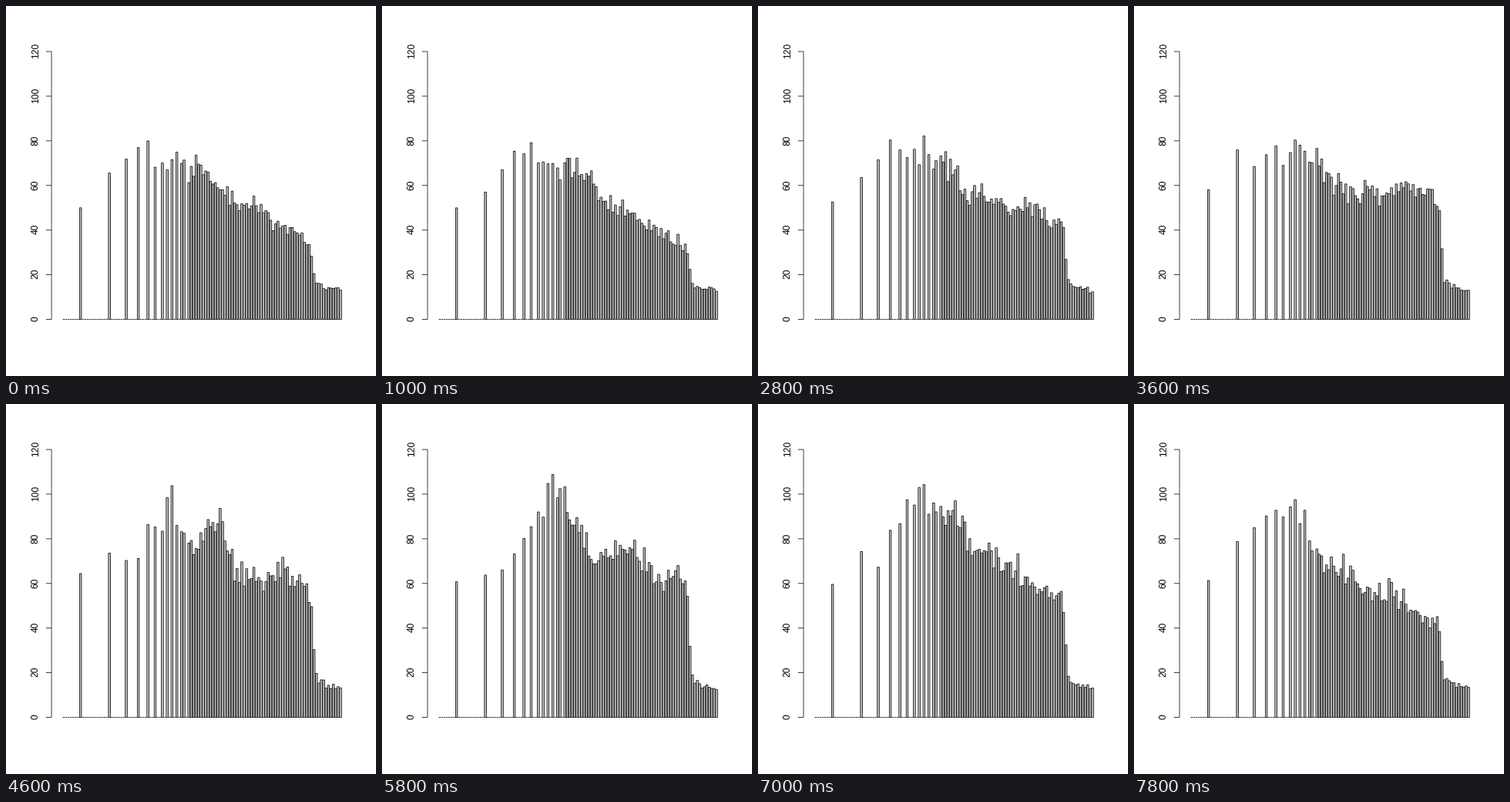
Recreate the animation shown at these times as a matplotlib script. Size 480 by 480 pixels, loop 8000 ms.

```python
import numpy as np
import matplotlib.pyplot as plt
from matplotlib.animation import FuncAnimation
from matplotlib.collections import LineCollection, PolyCollection

SIZE, DPI = 480, 80
FRAMES, STEP_MS = 40, 200
PX = 72 / DPI                      # points per pixel
LINE = 0.75 * PX

# plot area and bar layout, in pixels from the top left
LEFT, RIGHT, TOP, BASE = 59.04, 449.76, 59.04, 406.56
BARS = 116
SPAN = 1.2 * BARS - 0.2            # in bar widths
UNIT = (RIGHT - LEFT) / (1.08 * SPAN)
STARTS = LEFT + (0.04 * SPAN + 1.2 * np.arange(BARS)) * UNIT
ENDS = STARTS + UNIT
SCALE = (BASE - TOP) / 120

# low tones sit on the harmonics of a 12-step octave, then every step is filled
HARMONICS = np.round(12 * np.log2(np.arange(1, 13)) + 7.2).astype(int)
SHOWN = np.concatenate([HARMONICS, np.arange(52, BARS)])

# loudness contour over the bars at a few moments
KNOTS = [7, 31, 45, 55, 64, 72, 82, 92, 103]
CONTOURS = {
    0: [50, 74, 72, 67, 61, 53, 49, 40, 32],
    10: [52, 74, 72, 68, 57, 49, 43, 37, 32],
    18: [59, 79, 76, 66, 58, 57, 57, 60, 52],
    23: [62, 80, 96, 76, 87, 66, 60, 66, 55],
    29: [59, 71, 100, 90, 68, 76, 72, 60, 62],
    35: [59, 80, 98, 93, 80, 72, 68, 58, 55],
    39: [65, 90, 91, 69, 66, 57, 56, 49, 41],
}
CUTOFF = 103.8                     # bars above this are nearly silent

rng = np.random.default_rng(12)
jitter = 1 + 0.055 * rng.normal(size=(FRAMES, len(SHOWN))).clip(-2, 2)


def heights(n):
    moments = list(CONTOURS)
    knots = [np.interp(n, moments, col) for col in zip(*CONTOURS.values())]
    loud = np.interp(SHOWN, KNOTS, knots)
    quiet = 16 - 0.3 * (SHOWN - 105)
    share = 1 / (1 + np.exp(2.2 * (SHOWN - CUTOFF)))
    return (quiet + (loud - quiet) * share) * jitter[n]


fig = plt.figure(figsize=(SIZE / DPI, SIZE / DPI), dpi=DPI, facecolor="white")
ax = fig.add_axes([0, 0, 1, 1])
ax.set(xlim=(0, SIZE), ylim=(SIZE, 0))
ax.axis("off")

bars = PolyCollection([], facecolors="#bebebe", edgecolors="black",
                      linewidths=LINE, joinstyle="miter")
lines = [[(STARTS[i], BASE), (ENDS[i], BASE)]
         for i in range(BARS) if i not in SHOWN]
lines.append([(LEFT, TOP), (LEFT, BASE)])
for value in range(0, 121, 20):
    y = BASE - value * SCALE
    lines.append([(LEFT - 7.2, y), (LEFT, y)])
    ax.text(LEFT - 17.2, y - 1, str(value), rotation=90,
            rotation_mode="anchor", ha="center", va="baseline",
            family="Liberation Sans", fontsize=12 * PX)
rules = LineCollection(lines, colors="black", linewidths=LINE,
                       capstyle="butt")
for part in (bars, rules):
    part.set_snap(False)
    ax.add_collection(part, autolim=False)


def draw(n):
    tops = BASE - heights(n) * SCALE
    bars.set_verts([[(a, BASE), (a, y), (b, y), (b, BASE)]
                    for a, b, y in zip(STARTS[SHOWN], ENDS[SHOWN], tops)])
    return [bars]


anim = FuncAnimation(fig, draw, frames=FRAMES, interval=STEP_MS,
                     init_func=lambda: draw(0), repeat=True, repeat_delay=0)
plt.show()
```
